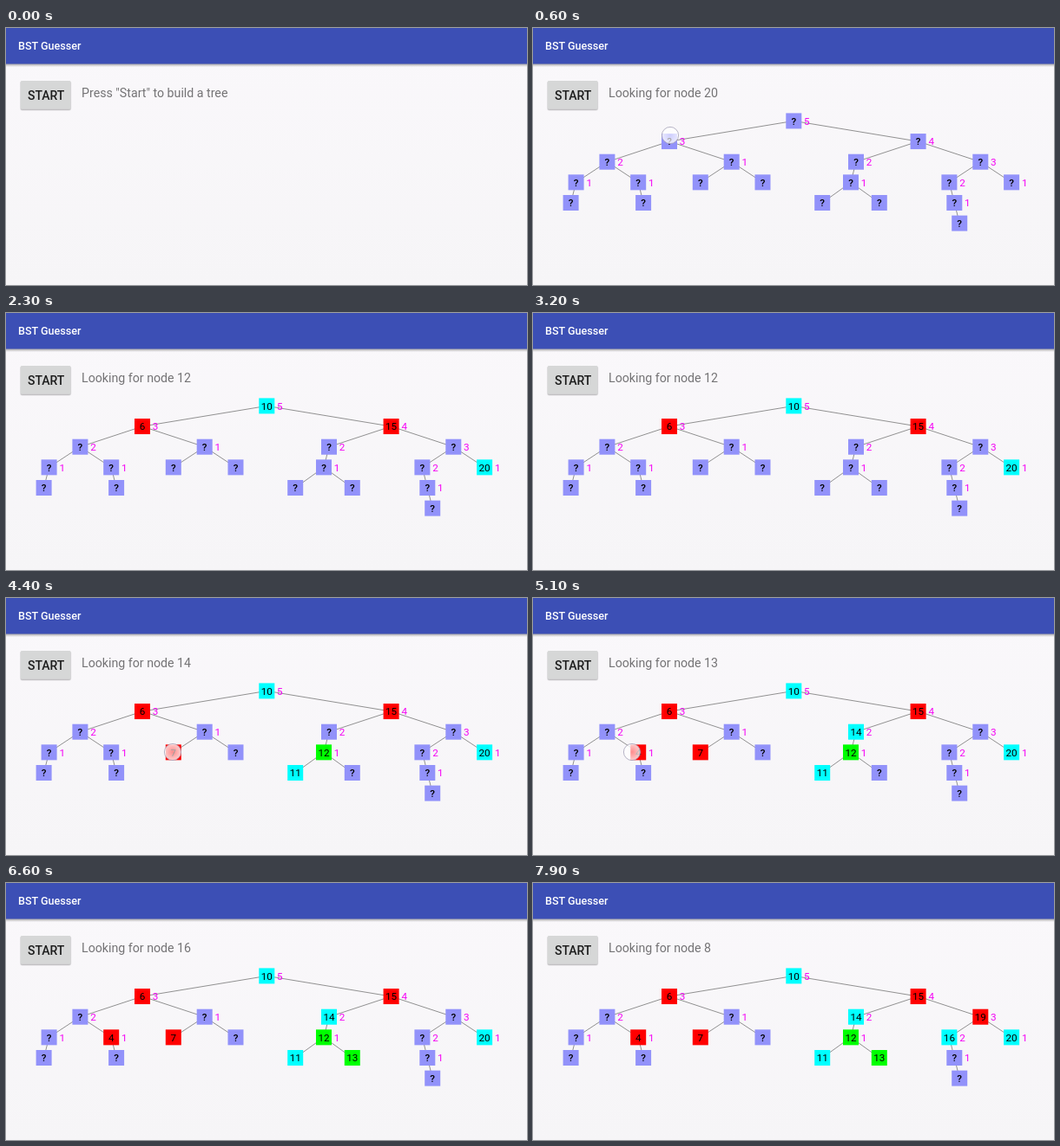
Write an HTML page that moves like this. It is 600 px wide and 297 px high and loops after 8 s.

```html
<!DOCTYPE html>
<html lang="en">
<head>
<meta charset="utf-8">
<title>BST Guesser</title>
<style>
  html, body { margin: 0; width: 100%; height: 100%; overflow: hidden; background: #f8f6f9; }
  svg { display: block; width: 100%; height: 100%; font-family: Roboto, sans-serif; }
  .node text { font-size: 11.7px; }
</style>
</head>
<body>
<svg id="stage" viewBox="0 0 600 297" preserveAspectRatio="none">
  <defs>
    <linearGradient id="page" x2="0" y2="1">
      <stop offset="0" stop-color="#faf8fb"/>
      <stop offset="1" stop-color="#f6f5f7"/>
    </linearGradient>
    <linearGradient id="shade" x2="0" y2="1">
      <stop offset="0" stop-color="#000" stop-opacity=".36"/>
      <stop offset="1" stop-color="#000" stop-opacity="0"/>
    </linearGradient>
    <radialGradient id="glow">
      <stop offset="0" stop-color="#fff" stop-opacity=".55"/>
      <stop offset="1" stop-color="#fff" stop-opacity=".8"/>
    </radialGradient>
  </defs>
  <rect width="600" height="297" fill="url(#page)"/>
  <rect y="41" width="600" height="4" fill="url(#shade)"/>
  <rect width="600" height="41.5" fill="#3c4fb5"/>
  <text x="14" y="25.3" font-size="12.6" font-weight="500" fill="#fff">BST Guesser</text>
  <rect x="16.2" y="61" width="59" height="34.4" rx="2.5" fill="#000" opacity=".1"/>
  <rect x="16.8" y="61.5" width="57.6" height="33.4" rx="2" fill="#000" opacity=".13"/>
  <rect x="17" y="61" width="57.4" height="32.8" rx="1.5" fill="#d6d7d7"/>
  <text x="46.2" y="82.7" font-size="14" font-weight="500" text-anchor="middle" fill="#1c1c1c">START</text>
  <text id="status" x="87" y="80" font-size="14.2" fill="#747375"></text>
  <g id="tree"></g>
  <circle id="touch" r="9.6" fill="url(#glow)" stroke="#a5a2b8" stroke-opacity=".8"/>
</svg>
<script>
const LOOP = 8000, TREE_AT = 300, TOP = 107.4, ROW = 23.65;
const HIDDEN = '#9292fa', RED = '#f00', GREEN = '#0f0', CYAN = '#0ff';

// [x, depth, parent index, height label, value]
const nodes = [
  [300.3, 0, -1, 5, 10],
  [157, 1, 0, 3, 6], [443.6, 1, 0, 4, 15],
  [85.4, 2, 1, 2], [228.7, 2, 1, 1], [372, 2, 2, 2, 14], [515.3, 2, 2, 3, 19],
  [49.6, 3, 3, 1], [121.2, 3, 3, 1, 4], [192.8, 3, 4, 0, 7], [264.5, 3, 4, 0],
  [366, 3, 5, 1, 12], [479.4, 3, 6, 2, 16], [551.1, 3, 6, 0, 20],
  [43.6, 4, 7, 0], [127.1, 4, 8, 0], [333.2, 4, 11, 0, 11], [398.8, 4, 11, 0, 13],
  [485.3, 4, 12, 1], [491.2, 5, 18, 0]
].map(([x, depth, parent, height, value]) =>
  ({ x, y: TOP + depth * ROW, parent, height, value }));
nodes[13].height = 1;

// A wrong pick turns red and uncovers its target in cyan; a right one turns green.
const rounds = [
  { target: 20, pick: 6, down: 600, reveal: 700, up: 1000, x: 158, y: 124 },
  { target: 10, pick: 15, down: 1800, reveal: 1900, up: 2200, x: 439, y: 126 },
  { target: 12, pick: 12, down: 3800, reveal: 3900, up: 4100, x: 366, y: 178 },
  { target: 11, pick: 7, down: 4300, reveal: 4400, up: 4700, x: 192, y: 178 },
  { target: 14, pick: 4, down: 4900, reveal: 5000, up: 5300, x: 114, y: 178 },
  { target: 13, pick: 13, down: 6300, reveal: 6400, up: 6600, x: 398, y: 203 },
  { target: 16, pick: 19, down: 7000, reveal: 7100, up: 7400, x: 514, y: 154 },
  { target: 8 }
];
const presses = [{ down: 100, up: 400, x: 46, y: 79 }, ...rounds.slice(0, -1)];

const $ = id => document.getElementById(id);
const tree = $('tree'), status = $('status'), touch = $('touch');

function add(parent, tag, attrs, text = '') {
  const el = document.createElementNS('http://www.w3.org/2000/svg', tag);
  for (const key in attrs) el.setAttribute(key, attrs[key]);
  el.textContent = text;
  return parent.appendChild(el);
}

for (const n of nodes) {
  const p = nodes[n.parent];
  if (p) add(tree, 'line', { x1: p.x, y1: p.y, x2: n.x, y2: n.y, stroke: '#858585', 'stroke-width': .9 });
}
for (const n of nodes) {
  const g = add(tree, 'g', { class: 'node' });
  n.box = add(g, 'rect', { x: n.x - 9, y: n.y - 9, width: 18, height: 18 });
  n.label = add(g, 'text', { x: n.x, y: n.y + 4.2, 'text-anchor': 'middle', fill: '#000' });
  if (n.height) add(g, 'text', { x: n.x + 11.8, y: n.y + 4.2, fill: '#f400f4' }, n.height);
}

function draw(t) {
  const started = t >= TREE_AT;
  const done = rounds.filter(r => t >= r.reveal);
  const colors = {};
  for (const { target, pick } of done) {
    colors[target] = CYAN;
    colors[pick] = pick === target ? GREEN : RED;
  }
  for (const n of nodes) {
    const color = colors[n.value];
    n.box.setAttribute('fill', color || HIDDEN);
    n.label.textContent = color ? n.value : '?';
    n.label.setAttribute('font-weight', color ? 400 : 500);
  }
  tree.setAttribute('visibility', started ? 'visible' : 'hidden');
  status.textContent = started
    ? 'Looking for node ' + rounds[done.length].target
    : 'Press "Start" to build a tree';

  const press = presses.find(p => t >= p.down && t < p.up);
  touch.setAttribute('visibility', press ? 'visible' : 'hidden');
  if (press) {
    touch.setAttribute('cx', press.x);
    touch.setAttribute('cy', press.y);
  }
}

const begin = performance.now();
function tick() {
  draw((performance.now() - begin) % LOOP);
  requestAnimationFrame(tick);
}
tick();
</script>
</body>
</html>
```
